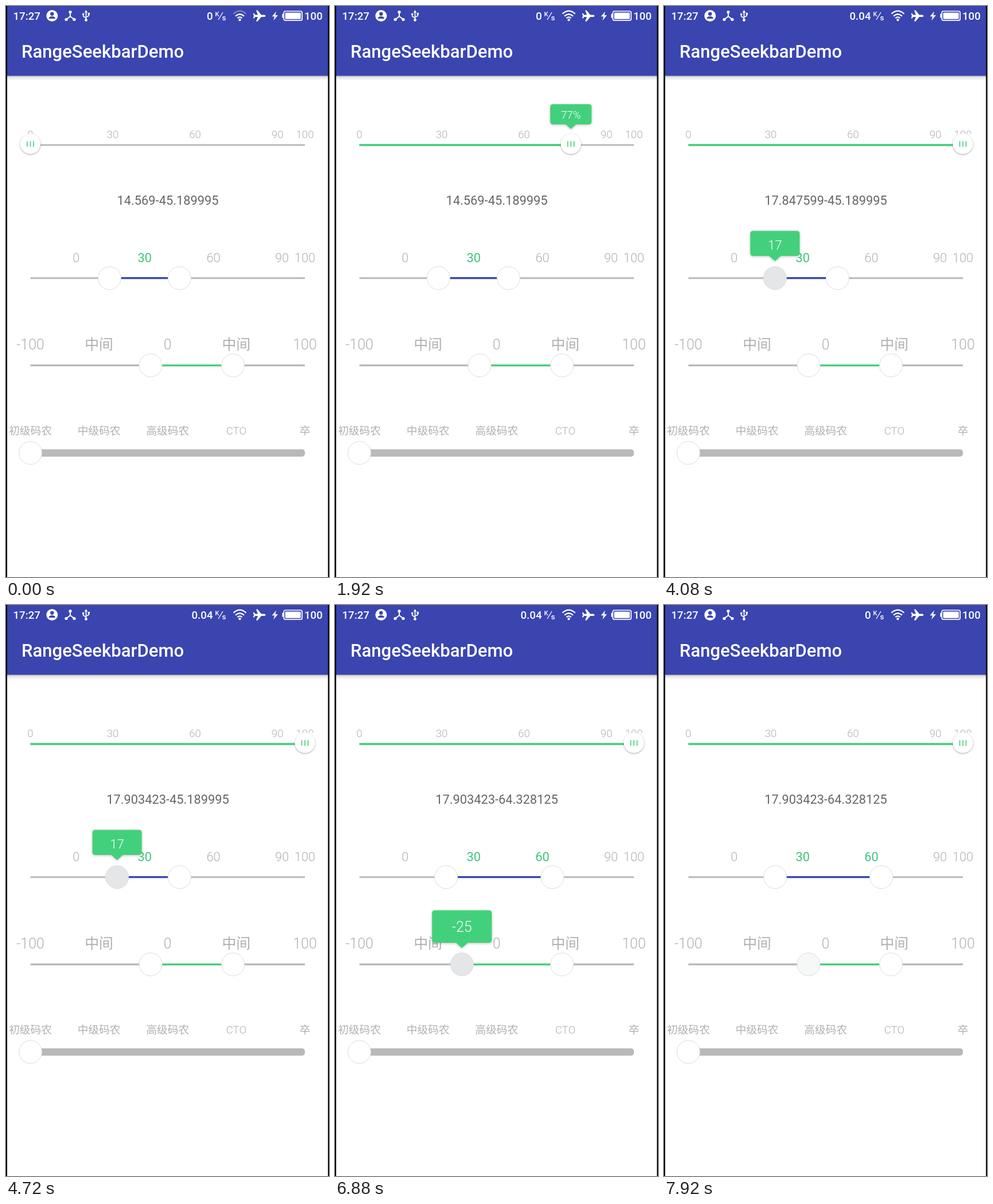
Recreate the animation shown at these times as an HTML page. Size 563 px wide and 994 px high, loop 8 s.

```html
<!DOCTYPE html>
<html lang="en">
<head>
<meta charset="utf-8">
<title>RangeSeekbarDemo</title>
<style>
html, body { margin: 0; width: 100%; height: 100%; overflow: hidden; background: #fff; }
svg { display: block; width: 563px; height: 994px; }
text { font-family: Roboto, "Noto Sans CJK SC", "Noto Sans CJK", sans-serif; }
.bar { fill: #fff; font-weight: 500; }
.label { fill: #b0b0b0; font-weight: 300; text-anchor: middle; }
.label.on { fill: #3fc47c; font-weight: 400; }
.track { stroke: #b9b9b9; }
.knob circle { stroke: #dcdcdc; stroke-width: 1; }
.tip { filter: drop-shadow(0 1px 2px rgba(0, 0, 0, .28)); }
.tip path { fill: #43d07c; }
.tip text { fill: #fff; font-weight: 300; text-anchor: middle; filter: none; }
.grip { filter: drop-shadow(0 1.5px 1.5px rgba(0, 0, 0, .35)); }
</style>
</head>
<body>
<svg id="stage" viewBox="0 0 563 994">
  <defs>
    <linearGradient id="shade" x2="0" y2="1">
      <stop stop-color="#000" stop-opacity=".3"/>
      <stop offset=".35" stop-color="#000" stop-opacity=".1"/>
      <stop offset="1" stop-color="#000" stop-opacity="0"/>
    </linearGradient>
  </defs>
  <rect width="563" height="994" fill="#fff"/>
  <rect y="121" width="563" height="9" fill="url(#shade)"/>
  <rect width="563" height="121.5" fill="#3a45b0"/>

  <g class="bar" font-size="18.66">
    <text x="12.5" y="24">17:27</text>
    <text id="speed" x="360.5" y="24" text-anchor="end">0</text>
    <text x="364.5" y="17.5" font-size="11">K</text>
    <text x="376.5" y="24.5" font-size="13.5">s</text>
    <path d="M370 24 L378 11" stroke="#fff" stroke-width="1.3"/>
    <text x="520" y="24">100</text>
    <text x="27" y="90" font-size="31.1">RangeSeekbarDemo</text>
  </g>

  <!-- status icons -->
  <g fill="#fff">
    <circle cx="80.3" cy="17" r="10"/>
    <g fill="#3a45b0">
      <circle cx="80.3" cy="13.7" r="3.2"/>
      <path d="M74.5 22 Q75 18 80.3 18 T86 22 Z"/>
    </g>
    <circle cx="112" cy="10.5" r="2.6"/>
    <circle cx="105" cy="23.5" r="2.6"/>
    <circle cx="119" cy="23.5" r="2.6"/>
    <path d="M112 10V18L105 23.5M112 18L119 23.5" fill="none" stroke="#fff" stroke-width="2"/>
    <path d="M139.5 10V24M139.5 21L134.7 18V14M139.5 19.5L144.3 17V13" fill="none" stroke="#fff" stroke-width="1.7"/>
    <path d="M136.7 11.5L139.5 7L142.3 11.5Z"/>
    <circle cx="139.5" cy="24.5" r="2.4"/>
    <circle cx="134.7" cy="14.2" r="1.8"/>
    <rect x="142.6" y="11.8" width="3.4" height="3.4"/>
    <g fill="none" stroke="#fff" stroke-width="2.3">
      <path id="wave" d="M396.5 13.6Q407.5 3.6 418.5 13.6"/>
      <path d="M400 17.6Q407.5 11 415 17.6"/>
      <path d="M403.4 21.2Q407.5 17.6 411.6 21.2"/>
    </g>
    <circle cx="407.5" cy="24.2" r="2.1"/>
    <path d="M452.5 17.2Q452.5 15.5 450 15.5H445L438.5 7.5H436L439 15.5H434.5L432.3 12.8H430.7L432 17.2L430.7 21.6H432.3L434.5 18.9H439L436 26.8H438.5L445 18.9H450Q452.5 18.9 452.5 17.2Z"/>
    <path d="M471 9.5L463.5 18.3H468L466.3 25.3L474 16H469.4Z"/>
    <rect x="484.2" y="9" width="32" height="16.2" rx="3" fill="none" stroke="#fff" stroke-width="1.7"/>
    <rect x="486.6" y="11.4" width="27.2" height="11.4" rx="1"/>
    <rect x="481.4" y="13.4" width="2.4" height="7.4" rx="1"/>
  </g>

  <text id="value" x="282" y="345.7" font-size="21.8" fill="#666" text-anchor="middle"></text>
  <g id="bars"></g>
  <path d="M1 0V994M562.2 0V994" stroke="#000" stroke-width="2"/>
</svg>
<script>
const LOOP = 8000, STEP = 80, LEFT = 42.5, WIDTH = 478.5;
const GREEN = '#43d07c';
const byId = id => document.getElementById(id);
const bars = byId('bars');

function add(parent, tag, attrs, text) {
  const el = document.createElementNS('http://www.w3.org/2000/svg', tag);
  for (const k in attrs) el.setAttribute(k, attrs[k]);
  if (text !== undefined) el.textContent = text;
  parent.append(el);
  return el;
}

const scale = (min, max) => v => LEFT + (v - min) / (max - min) * WIDTH;
const xPercent = scale(0, 100), xRange = scale(-20, 100), xSigned = scale(-100, 100);

function addLabels(names, place, y, size) {
  return names.map((name, i) =>
    add(bars, 'text', { class: 'label', x: place(name, i), y, 'font-size': size }, name));
}

function addLine(y, color) {
  add(bars, 'path', { class: 'track', d: `M${LEFT} ${y}H${LEFT + WIDTH}`, 'stroke-width': 3.1 });
  return add(bars, 'path', { stroke: color, 'stroke-width': 3.3 });
}

function addKnob(x, y) {
  const g = add(bars, 'g', { class: 'knob', transform: `translate(${x} ${y})` });
  const disc = add(g, 'circle', { r: 20, fill: '#fff' });
  return { y, g, disc };
}

// Bubble with its pointer, centred on x = 0.
function addTip(half, top, bottom, point, baseline, size) {
  const g = add(bars, 'g', {});
  const shape = add(g, 'g', { class: 'tip' });
  const r = 5, w = half - r, h = bottom - top - 2 * r, n = point - bottom;
  add(shape, 'path', {
    d: `M${-w} ${top}h${2 * w}q${r} 0 ${r} ${r}v${h}q0 ${r} ${-r} ${r}H${n + 1}L0 ${point}L${-n - 1} ${bottom}` +
       `H${-w}q${-r} 0 ${-r} ${-r}v${-h}q0 ${-r} ${r} ${-r}Z`
  });
  const text = add(g, 'text', { y: baseline, 'font-size': size, fill: '#fff', 'font-weight': 300, 'text-anchor': 'middle' });
  return { g, text };
}

// Percent bar
addLabels([0, 30, 60, 90, 100], xPercent, 230, 18.66);
const percentLine = addLine(242, GREEN);
const grip = add(bars, 'g', {});
add(grip, 'rect', { x: -18, y: 222.5, width: 36, height: 9, fill: '#fff' });
add(grip, 'circle', { class: 'grip', cy: 240, r: 17.7, fill: '#fff' });
add(grip, 'path', { d: 'M-5.5 235.3V245.3M0 235.3V245.3M5.5 235.3V245.3', stroke: GREEN, 'stroke-width': 1.6 });

// Range bar
const rangeMarks = [0, 30, 60, 90, 100];
const rangeLabels = addLabels(rangeMarks, xRange, 446, 21.8);
const rangeLine = addLine(473.7, '#3744ae');
const rangeLow = addKnob(0, 473.7), rangeHigh = addKnob(0, 473.7);

// Signed bar
const fifth = (_, i) => LEFT + WIDTH * i / 4;
addLabels(['-100', '中间', '0', '中间', '100'], fifth, 598, 24.9);
const signedLine = addLine(625.6, GREEN);
const SIGNED_HIGH = xSigned(47.6);
const signedLow = addKnob(0, 625.6);
addKnob(SIGNED_HIGH, 625.6);

// Step bar
addLabels(['初级码农', '中级码农', '高级码农', 'CTO', '卒'], fifth, 745.5, 18.66);
add(bars, 'rect', { x: LEFT, y: 771.8, width: WIDTH, height: 12.6, rx: 5, fill: '#b9b9b9' });
addKnob(LEFT, 778);

const percentTip = addTip(36, 171, 206, 214, 195.5, 18.66);
const rangeTip = addTip(43, 391.5, 435, 444, 424, 21.8);
const signedTip = addTip(52, 531.5, 588, 597, 569, 24.9);

// Motion: [time, value] points
const percentKeys = [[1120, 0], [1920, 77.05], [2000, 88], [2080, 96], [2160, 100]];
const lowKeys = [[2880, 14.569], [2960, 12.298378], [3680, 12.298378], [4080, 17.847599], [4560, 17.88], [4720, 17.903423]];
const highKeys = [[5360, 45.189995], [5600, 64.328125]];
const signedKeys = [[6160, -12.4], [6240, -14.6], [6800, -14.6], [7200, -68.1], [7360, -76], [7680, -12.4]];

function at(keys, t) {
  if (t <= keys[0][0]) return keys[0][1];
  for (let i = 1; i < keys.length; i++) {
    const [t0, v0] = keys[i - 1], [t1, v1] = keys[i];
    if (t <= t1) return v0 + (v1 - v0) * (t - t0) / (t1 - t0);
  }
  return keys[keys.length - 1][1];
}

const clamp = v => Math.max(0, Math.min(1, v));
const held = (t, down, up) => t >= down && t < up;
const pressure = (t, down, up) => t < up ? clamp((t - down) / 160) : clamp(1 - (t - up + STEP) / 240);

function setKnob(knob, x, press) {
  knob.g.setAttribute('transform', `translate(${x} ${knob.y})`);
  const c = [228, 230, 232].map(v => Math.round(255 + (v - 255) * press));
  knob.disc.setAttribute('fill', `rgb(${c})`);
}

function setTip(tip, shown, x, text) {
  tip.g.style.display = shown ? '' : 'none';
  tip.g.setAttribute('transform', `translate(${x} 0)`);
  tip.text.textContent = text;
}

const setLine = (line, y, x0, x1) => line.setAttribute('d', `M${x0} ${y}H${x1}`);

function draw(time) {
  const t = Math.floor(time / STEP) * STEP;

  const percent = at(percentKeys, t), px = xPercent(percent);
  setLine(percentLine, 242, LEFT, px);
  grip.setAttribute('transform', `translate(${px} 0)`);
  setTip(percentTip, held(t, 1120, 2240), px, Math.trunc(percent) + '%');

  const low = at(lowKeys, t), high = at(highKeys, t);
  const lx = xRange(low), hx = xRange(high);
  const lowHeld = held(t, 2960, 5280), highHeld = held(t, 5360, 5680);
  setLine(rangeLine, 473.7, lx, hx);
  setKnob(rangeLow, lx, pressure(t, 2960, 5280));
  setKnob(rangeHigh, hx, pressure(t, 5360, 5680));
  setTip(rangeTip, lowHeld || highHeld, highHeld ? hx : lx, Math.trunc(highHeld ? high : low));
  rangeLabels.forEach((el, i) =>
    el.classList.toggle('on', rangeMarks[i] >= low && rangeMarks[i] <= high));
  byId('value').textContent = +low.toFixed(6) + '-' + +high.toFixed(6);

  const signed = at(signedKeys, t), sx = xSigned(signed);
  setLine(signedLine, 625.6, sx, SIGNED_HIGH);
  setKnob(signedLow, sx, pressure(t, 6240, 7840));
  setTip(signedTip, held(t, 6240, 7840), sx, Math.trunc(signed));

  byId('speed').textContent = held(t, 3840, 7040) ? '0.04' : '0';
  byId('wave').style.opacity = t < 1120 ? .35 : 1;
}

const start = performance.now();
function tick() {
  draw((performance.now() - start) % LOOP);
  requestAnimationFrame(tick);
}
tick();
</script>
</body>
</html>
```
